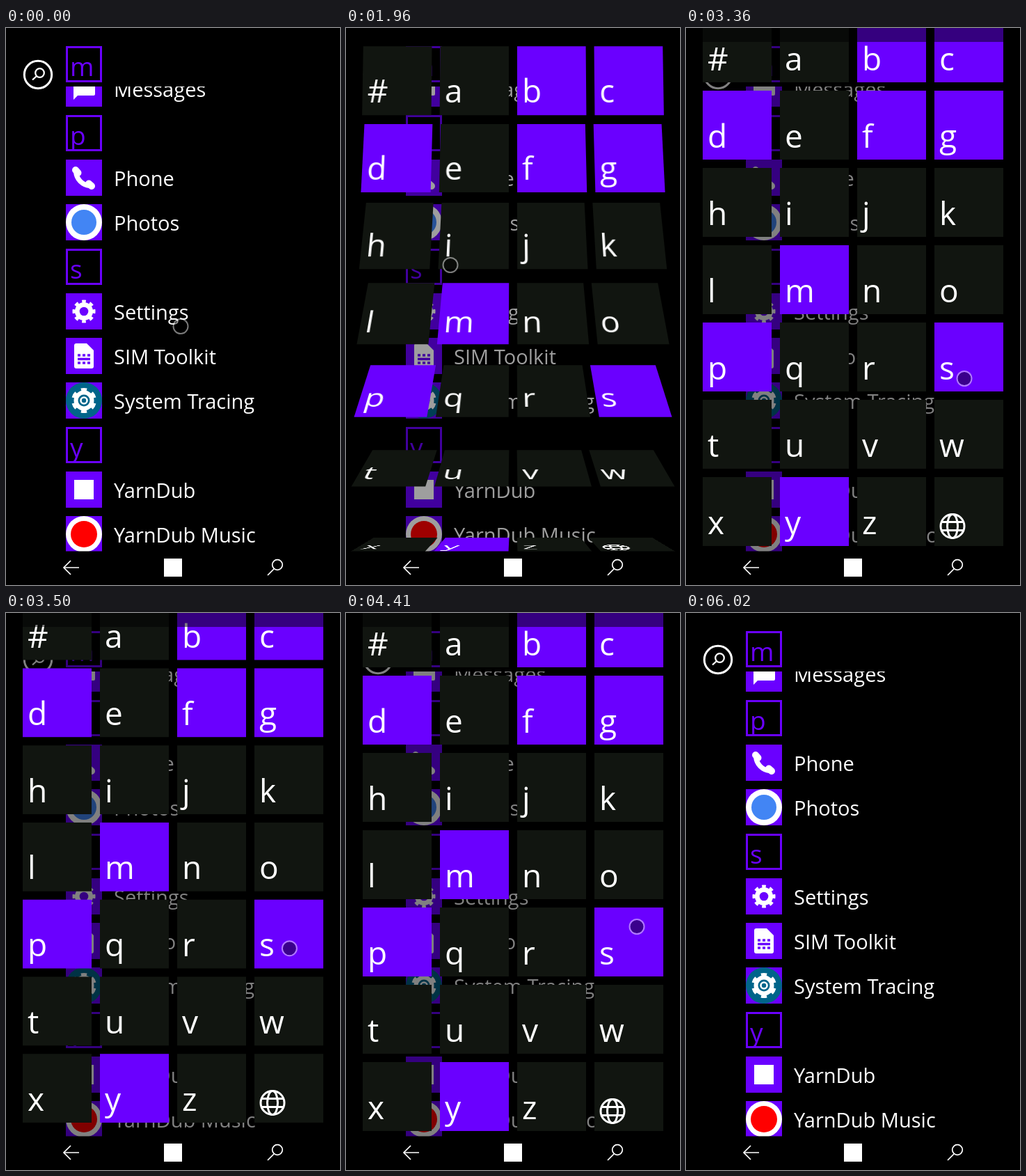
Animation, 480 px wide and 800 px high, one loop 6300 ms. Source, as an HTML page:

```html
<!DOCTYPE html>
<html lang="en">
<head>
<meta charset="utf-8">
<title>App list</title>
<style>
html, body { margin: 0; width: 100%; height: 100%; overflow: hidden; background: #000; }
#stage { position: relative; width: 480px; height: 800px; overflow: hidden; background: #000; }
#stage > * { position: absolute; left: 0; top: 0; }
svg { display: block; overflow: hidden; }
text { font: 400 29px "Open Sans", sans-serif; fill: #fff; }
.head { font-size: 37px; fill: #6a00ff; }
.line { fill: none; stroke: #fff; }
#panel { width: 480px; height: 752px; overflow: hidden; }
#grid { position: absolute; inset: 0; transform-origin: 0 0; }
.row { position: absolute; left: 24px; width: 432px; height: 99px; }
.cell { position: absolute; top: 0; width: 99px; height: 99px; background: #111510; }
.cell.on { background: #6a00ff; }
.cell text { font-size: 46px; }
#status { width: 480px; height: 20px; background: rgba(0, 0, 0, .5); }
#touch { width: 19px; height: 19px; margin: -11.5px; border: 2px solid rgba(255, 255, 255, .48);
  border-radius: 50%; background: rgba(0, 0, 0, .45); background-clip: padding-box; }
</style>
</head>
<body>
<div id="stage">
  <svg id="list" width="480" height="800"></svg>
  <div id="panel"><div id="grid"></div></div>
  <div id="status"></div>
  <svg id="nav" width="480" height="800">
    <path d="M0 751.5h480v49H0z"/>
    <path class="line" stroke-width="1.7" d="M105 775H83m10-10-10 10 10 10M385 777l-9 9"/>
    <circle class="line" stroke-width="1.7" cx="390" cy="771" r="7.3"/>
    <path fill="#fff" d="M227 762h26v26h-26z"/>
  </svg>
  <div id="touch"></div>
</div>
<script>
const LOOP = 6300, STEP = 70, ACCENT = '#6a00ff';
const $ = id => document.getElementById(id);

// Icons are drawn in a 52 px tile.
const disc = (r, color) => `<circle cx="26" cy="26" r="${r}" fill="${color}"/>`;
const gear = (teeth, r, hole, back) => disc(r - 3.5, '#fff') +
  `<circle class="line" cx="26" cy="26" r="${r - 2.5}" stroke-width="5" pathLength="${teeth * 2}"
    stroke-dasharray="1" stroke-dashoffset=".5" transform="rotate(-90 26 26)"/>` + disc(hole, back);
const white = d => `<path fill="#fff" d="${d}"/>`;
const icons = {
  bubble: white('M13 12h27q2 0 2 2v20q0 2-2 2H17l-6 6V14q0-2 2-2z'),
  phone: `<g class="line" stroke-linecap="round"><path stroke-width="7" d="M14.5 17C15 28 24 37 35 37.5"/>
    <path stroke-width="10" d="M14 15l3.5 4M33 34.5l4 3.5"/></g>`,
  photos: disc(26, '#fff') + disc(18, '#4285f4'),
  settings: gear(8, 16.5, 6.3, ACCENT),
  sim: white('M15 8h15l10 10v23q0 3-3 3H15q-3 0-3-3V11q0-3 3-3z') +
    `<path stroke="${ACCENT}" stroke-width="3.4" d="M17 25h4m3 0h4m3 0h4M17 30.5h18M17 36h4m3 0h4m3 0h4"/>`,
  tracing: disc(26, '#00658a') + gear(6, 18, 8.5, '#00658a') + disc(5.8, '#fff') + disc(3.2, '#00658a'),
  square: white('M12 12h28v28H12z'),
  music: disc(26, '#fff') + disc(19, '#f00')
};

const header = (letter, y) => `<g transform="translate(86 ${y})">
  <path fill="none" stroke="${ACCENT}" stroke-width="3" d="M1.5 1.5h49v49h-49z"/>
  <text class="head" x="6" y="43">${letter}</text></g>`;
const app = (name, icon, y) => `<g transform="translate(86 ${y})">
  <path fill="${ACCENT}" d="M0 0h52v52H0z"/>${icons[icon]}<text x="69" y="37.5">${name}</text></g>`;

$('list').innerHTML = `<clipPath id="clip"><path d="M0 84h480v670H0z"/></clipPath>
  <g class="line" stroke-width="3"><circle cx="46" cy="67" r="19.7"/>
  <g stroke-width="2.3"><circle cx="48.5" cy="64.5" r="6.3"/><path d="M44 69l-6 5.5"/></g></g>` +
  header('m', 26) + `<g clip-path="url(#clip)">` + app('Messages', 'bubble', 61) + '</g>' +
  [['p'], ['Phone', 'phone'], ['Photos', 'photos'], ['s'], ['Settings', 'settings'],
   ['SIM Toolkit', 'sim'], ['System Tracing', 'tracing'], ['y'],
   ['YarnDub', 'square'], ['YarnDub Music', 'music']]
  .map(([name, icon], i) => icon ? app(name, icon, 125 + 64 * i) : header(name, 125 + 64 * i)).join('');

const globe = `<g class="line" stroke-width="3"><circle cx="26" cy="70.5" r="17"/>
  <ellipse cx="26" cy="70.5" rx="7.5" ry="17"/><path d="M10 64.5h32M10 76.5h32"/></g>`;
const keys = [...'#abcdefghijklmnopqrstuvwxyz', ''];
const rows = Array.from({ length: 7 }, (_, r) => {
  const row = document.createElement('div');
  row.className = 'row';
  row.style.top = 26 + 111 * r + 'px';
  row.innerHTML = keys.slice(r * 4, r * 4 + 4).map((key, c) =>
    `<div class="cell ${key && 'bcdfgmpsy'.includes(key) ? 'on' : ''}" style="left:${111 * c}px">
      <svg width="99" height="99">${key ? `<text x="7" y="81.5">${key}</text>` : globe}</svg></div>`).join('');
  return $('grid').appendChild(row);
});

const ramp = (t, a, b) => Math.min(1, Math.max(0, (t - a) / (b - a)));
const smooth = u => u * u * (3 - 2 * u);
const easeOut = u => 1 - (1 - u) ** 3;

const DRAG = 3200, RELEASE = 3740, OPEN = 1770, CLOSE = 4556, MAX_SCROLL = 47;
// time, x, y
const path = [[0, 250.5, 428], [665, 250.5, 428], [1330, 149.5, 340], [2835, 149.5, 340],
  [DRAG, 395, 550], [3360, 399.5, 503], [3700, 417.5, 450]];

function touchAt(t) {
  let i = 1;
  while (i < path.length - 1 && t > path[i][0]) i++;
  const [t0, x0, y0] = path[i - 1], [t1, x1, y1] = path[i];
  let u = ramp(t, t0, t1);
  if (t < DRAG) u = smooth(u);
  return [x0 + (x1 - x0) * u, y0 + (y1 - y0) * u];
}

function draw(t) {
  const [x, y] = touchAt(t);
  $('touch').style.transform = `translate(${x}px, ${y}px)`;
  $('touch').style.opacity = 1 - ramp(t, 5000, 5180);

  const drag = t < DRAG ? 0 : path[4][2] - y;
  const over = Math.max(0, drag - MAX_SCROLL) * .47 * (1 - easeOut(ramp(t, RELEASE, 4130)));
  const shift = Math.min(drag, MAX_SCROLL) + over + 20 * ramp(t, CLOSE, 4690);
  $('grid').style.transform = `translateY(${-shift}px) scaleY(${1 - over * .000216})`;
  $('list').style.opacity = 1 - .5 * (easeOut(ramp(t, OPEN, 2270)) - ramp(t, CLOSE, 4690));

  rows.forEach((row, r) => {
    const closing = t >= CLOSE;
    const start = closing ? CLOSE + 15 * r : OPEN + 29 * r;
    const u = ramp(t, start, start + (closing ? 65 : 230));
    const angle = closing ? -90 * u * u : 90 * (1 - u) ** 2;
    row.style.visibility = Math.abs(angle) > 89 ? 'hidden' : 'visible';
    row.style.transform = angle ? `perspective(${closing ? 1500 : 600}px) rotateX(${angle}deg)` : 'none';
  });
}

function tick() {
  draw(Math.floor(performance.now() % LOOP / STEP) * STEP);
  requestAnimationFrame(tick);
}
tick();
</script>
</body>
</html>
```
